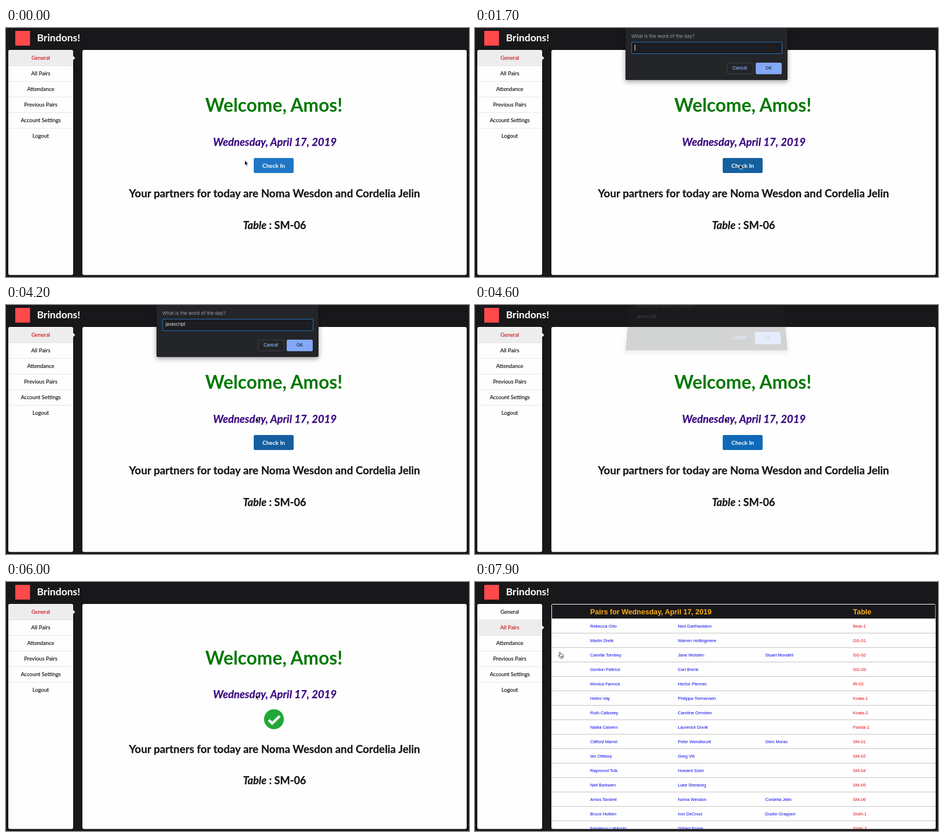
An HTML page that plays this animation: 800x431 px, repeating every 8 s.

```html
<!DOCTYPE html>
<html lang="en">
<head>
<meta charset="utf-8">
<title>Check-in demo</title>
<style>
html, body { margin: 0; width: 800px; height: 431px; overflow: hidden; background: #18171a; }
svg { position: absolute; left: 0; top: 0; }
text { font-family: Lato, sans-serif; }
.mid { text-anchor: middle; }
.bold { font-weight: 700; }
.item { font-size: 9.375px; text-anchor: middle; stroke-width: .12px; }
.big {
  font-weight: 700; font-size: 18.8px; text-anchor: middle;
  fill: #161718; stroke: #161718; stroke-width: .25px;
}
.date { font-size: 18.6px; font-style: italic; fill: #3b0a80; stroke: #3b0a80; }
.seat { font-size: 18.2px; }
.cell { font-family: "Liberation Sans", Arial, sans-serif; font-size: 7.5px; }
.head { font-family: "Liberation Sans", Arial, sans-serif; font-size: 12.5px; font-weight: 700; fill: #fbae17; }
.dialog {
  position: absolute; left: 260px; top: 0; width: 280px; background: #232528;
  border-radius: 0 0 2px 2px; box-shadow: 0 3px 8px rgba(0, 0, 0, .38);
  transform-origin: 50% 100%; font: 8.125px/10px Inter, sans-serif; color: #9a9ea4;
}
.dialog > * { position: absolute; box-sizing: border-box; white-space: pre; }
.title { left: 10px; top: 8.5px; }
.field {
  left: 9.5px; top: 24px; width: 261px; height: 21px; padding-left: 5px;
  background: #1c1d20; border: 1.3px solid #2270b4; border-radius: 2px;
  font-size: 7.5px; line-height: 18.4px; color: #eee;
}
.caret { display: inline-block; width: .8px; height: 10px; background: #eee; vertical-align: middle; }
.btn {
  height: 20px; border-radius: 2.5px; text-align: center;
  font-size: 7.5px; line-height: 20px; font-weight: 600;
}
.ok { background: #82a8f7; color: #24344f; }
.cancel { border: .8px solid #3d4044; color: #86a9ee; line-height: 18.4px; }
</style>
</head>
<body>
<svg id="page" width="800" height="431"></svg>
<div class="dialog" id="prompt" style="height:89.5px">
  <span class="title">What is the word of the day?</span>
  <div class="field" id="field"><span id="word"></span><i class="caret" id="caret"></i></div>
  <div class="btn cancel" style="left:174.5px;top:59.5px;width:46px">Cancel</div>
  <div class="btn ok" style="left:225px;top:59.5px;width:45px">OK</div>
</div>
<div class="dialog" id="alert" style="height:59.5px">
  <span class="title">Successfully checked in</span>
  <div class="btn ok" style="left:230px;top:29.5px;width:40px">OK</div>
</div>
<svg width="800" height="431">
  <g id="mouse">
    <path id="arrow" d="M0 0V8.6L2 6.8L3.4 10L4.9 9.4L3.5 6.3H6.2Z" fill="#000" stroke="#fff" stroke-width=".7"/>
    <path id="hand" d="M0 .2Q1-.5 1.6.6L2.1 3.6Q3 2.8 3.7 3.7Q4.7 3 5.3 4Q6.5 3.6 6.7 5L6.5 8L5.6 10.4H1.3L-1.7 6.6Q-2.2 5.2-.8 5.3L.3 6.1L-.5 1.2Z
      M2.3 6.5V8.6M3.6 6.5V8.6M4.9 6.5V8.6" fill="#fff" stroke="#111" stroke-width=".75" stroke-linejoin="round"/>
  </g>
</svg>
<script>
const LOOP = 8000, STEP = 100;
const ROW = 26.9, MENU_TOP = 38.5;
const SIDE = [4, 38, 112, 389.5], CARD = [132, 38, 664, 389.5];
const $ = id => document.getElementById(id);

const menu = ['General', 'All Pairs', 'Attendance', 'Previous Pairs', 'Account Settings', 'Logout'];
const pairs = `Rebecca Orlo,Ned Garthwoldon,,Bear-1
Martin Drelk,Warren Hollingmere,,GG-01
Camilla Tornbey,Jane Wolsten,Stuart Mondell,GG-02
Gordon Paltrice,Carl Brenk,,GG-03
Monica Farrock,Hector Plenner,,IR-02
Helen Vay,Philippa Tormansen,,Koala-1
Ruth Callowey,Caroline Ormsten,,Koala-2
Nadia Calvern,Laurence Dovik,,Panda-1
Clifford Marrel,Peter Wendlecott,Glen Morav,SM-01
Ian Ottlewy,Greg Vill,,SM-02
Raymond Tolk,Howard Szen,,SM-04
Neil Barkwen,Luke Stenborg,,SM-05
Amos Tandrel,Noma Wesdon,Cordelia Jelin,SM-06
Bruce Holben,Ivor DeCroul,Dustin Graypen,Sloth-1
Frederico LaMontri,Gilbert Frone,,Sloth-2`.split('\n').map(r => r.split(','));
const columns = [199, 350.5, 501.5, 653];

const rect = (x, y, w, h, fill, more = '') =>
  `<rect x="${x}" y="${y}" width="${w}" height="${h}" fill="${fill}" ${more}/>`;
const panel = box => rect(...box, '#fefefe', 'rx="3"');
const text = (x, y, str, more = '') => `<text x="${x}" y="${y}" ${more}>${str}</text>`;

function sidebar() {
  let s = panel(SIDE) + '<g clip-path="url(#side)">';
  menu.forEach((label, i) => {
    const y = MENU_TOP + i * ROW, line = Math.round(y);
    s += rect(4, line, 112, 27, '#fefefe', `id="row${i}"`);
    if (i) s += rect(4, line, 112, 1, '#e6e6e7');
    s += text(60, y + 16.9, label, `id="label${i}" class="item"`);
  });
  return s + '</g><path id="notch" d="M116 -3.6L119.6 0L116 3.6Z" fill="#f2f2f2"/>';
}

function general() {
  return `<g id="general">
    ${text(462.8, 0, 'Welcome, Amos!', 'id="welcome" class="mid bold" font-size="31.8" fill="#007800"')}
    ${text(464.5, 0, 'Wednesday, April 17, 2019', 'id="date" class="big date"')}
    <g id="button">${rect(428, 225, 69, 26, '#2077c6', 'id="face" rx="2.5"')}
      ${text(462.5, 241.6, 'Check In', 'class="mid bold" font-size="10.1" fill="#fff"')}</g>
    <g id="done"><circle cx="463" cy="237.5" r="17.2" fill="#21a738"/>
      <path d="M454 238.8L460 244.6L473 232" fill="none" stroke="#fff" stroke-width="4.4"/></g>
    ${text(464, 0, 'Your partners for today are Noma Wesdon and Cordelia Jelin', 'id="partners" class="big"')}
    ${text(464, 0, '<tspan font-style="italic">Table</tspan> : SM-06', 'id="seat" class="big seat"')}
  </g>`;
}

function table() {
  let s = '<g id="table" clip-path="url(#card)">' + rect(133, 39, 662.4, 24.5, '#18171a')
    + text(199, 55.7, 'Pairs for Wednesday, April 17, 2019', 'class="head"')
    + text(653, 55.7, 'Table', 'class="head"');
  pairs.forEach((row, i) => {
    const y = 76 + i * 25;
    s += rect(132, y - 13, 664, 1, '#c4c4c6');
    row.forEach((str, c) => {
      s += text(columns[c], y + 2.8, str, `class="cell" fill="${c < 3 ? '#0808e8' : '#e00c0c'}"`);
    });
  });
  return s + '</g>';
}

$('page').innerHTML = `<defs>
    <clipPath id="side">${panel(SIDE)}</clipPath>
    <clipPath id="card">${panel(CARD)}</clipPath>
  </defs>`
  + rect(16, 5, 25.5, 25.5, '#ff4a4c')
  + text(53.5, 23, 'Brindons!', 'class="bold" font-size="17.5" fill="#fff"')
  + sidebar() + panel(CARD) + general() + table();

// time, x, y of the pointer tip
const path = [
  [0, 412.5, 229], [200, 412.5, 229], [900, 457, 236], [1900, 457, 236], [2400, 431.5, 194.5],
  [6300, 431.5, 194.5], [7000, 57, 109], [7200, 57, 109], [7400, 60, 82], [7600, 60, 82], [7900, 146, 121.5]
];
const keys = [2600, 2750, 2900, 3050, 3250, 3400, 3500, 3600, 3700, 3900];

const clamp = v => Math.min(1, Math.max(0, v));
const ease = v => v * v * (3 - 2 * v);
const show = (id, on) => { $(id).style.display = on ? '' : 'none'; };

function pointer(t) {
  const i = Math.max(1, path.findIndex(p => p[0] >= t));
  const [t0, x0, y0] = path[i - 1], [t1, x1, y1] = path[i];
  const k = ease(clamp((t - t0) / (t1 - t0)));
  return [x0 + (x1 - x0) * k, y0 + (y1 - y0) * k];
}

// Sheet drops in from the top and tilts back out.
function sheet(id, t, from, to) {
  const k = Math.min(clamp((t - from) / 200), 1 - clamp((t - to) / 200));
  const el = $(id), away = 1 - k;
  show(id, k > 0);
  el.style.opacity = k;
  el.style.transform = away
    ? `translateY(${-14.5 * away}px) scaleY(${1 + .1 * away}) perspective(120px) rotateX(${6.3 * away}deg)`
    : 'none';
}

function draw(t) {
  const [x, y] = pointer(t);
  const listing = t >= 7600, checked = t >= 5900;
  const active = listing ? 1 : 0;
  const hover = x < 116 ? Math.floor((y - MENU_TOP) / ROW) : -1;
  const onButton = t < 1300 && x > 428 && x < 497 && y > 225;

  menu.forEach((_, i) => {
    const ink = i === active ? '#c4161c' : '#0c0c0d';
    $('row' + i).setAttribute('fill', i === active ? '#ededed' : i === hover ? '#f2f2f4' : '#fefefe');
    $('label' + i).setAttribute('fill', ink);
    $('label' + i).setAttribute('stroke', ink);
  });
  $('notch').setAttribute('transform', `translate(0 ${MENU_TOP + (active + .5) * ROW})`);

  show('general', !listing);
  show('table', listing);
  show('button', !checked);
  show('done', checked);
  const lines = { welcome: [144.6, -1.5], date: [204, -3], partners: [292.6, 3], seat: [348.4, 1.4] };
  for (const id in lines) $(id).setAttribute('y', lines[id][0] + (checked ? lines[id][1] : 0));
  $('face').setAttribute('fill',
    t >= 4500 ? '#1069b8' : t >= 1200 ? '#155f9e' : onButton ? '#1b6fbc' : '#2077c6');

  sheet('prompt', t, 1300, 4440);
  sheet('alert', t, 4850, 5600);
  const typed = keys.filter(k => t >= k).length;
  $('word').textContent = 'javascript'.slice(0, typed);
  const typing = t >= keys[0] && t < 4000;
  $('caret').style.visibility = t < 4440 && (typing || (t - 1400) % 1000 < 500) ? '' : 'hidden';
  $('field').style.borderColor = t < 4440 ? '' : 'transparent';

  const hand = onButton || x < 116 || t >= 7200;
  show('hand', hand);
  show('arrow', !hand);
  $('mouse').setAttribute('transform', `translate(${x} ${y})`);
}

const start = performance.now();
function tick() {
  const t = (performance.now() - start) % LOOP;
  draw(Math.floor(t / STEP) * STEP);
  requestAnimationFrame(tick);
}
tick();
</script>
</body>
</html>
```
